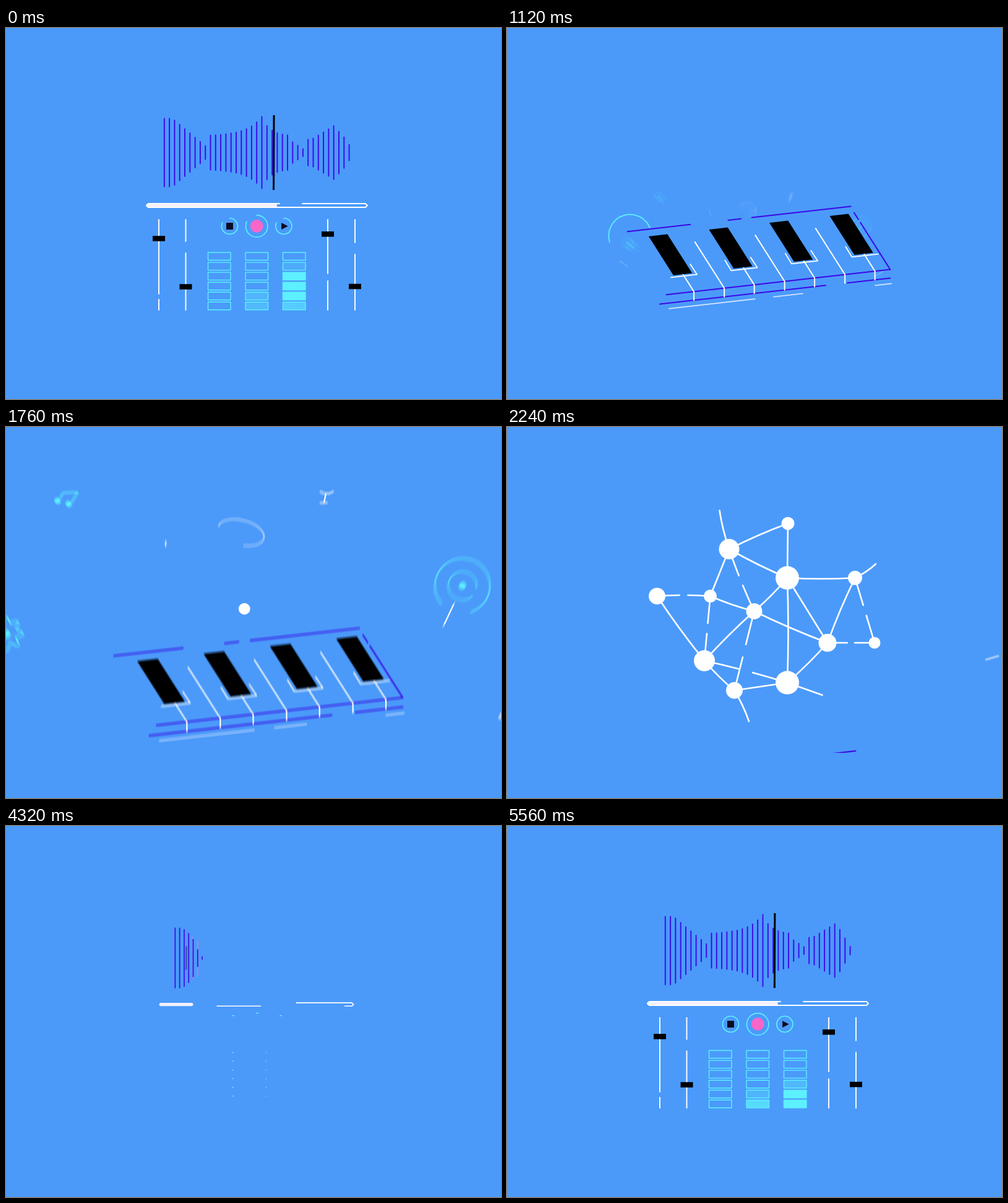
These frames come from a looping animation (800x600 px, 5600 ms). An HTML page with a canvas:

```html
<!DOCTYPE html>
<html lang="en">
<head>
<meta charset="utf-8">
<title>Music loop</title>
<style>
html, body { margin: 0; width: 100%; height: 100%; overflow: hidden; background: #4b9afa; }
canvas { display: block; }
</style>
</head>
<body>
<canvas id="stage" width="800" height="600"></canvas>
<script>
const LOOP = 5600, BG = '#4b9afa', WHITE = '#fff', INK = '#000', PURPLE = '#3d08e8', CYAN = '#5df0ff', PINK = '#f966c9';
const view = document.getElementById('stage').getContext('2d');
const buffer = document.createElement('canvas');
buffer.width = 800;
buffer.height = 600;
const c = buffer.getContext('2d');

const clamp = v => Math.max(0, Math.min(1, v));
const ramp = (t, start, span) => clamp((t - start) / span);
const easeOut = v => 1 - (1 - v) ** 2;
const smooth = v => v * v * (3 - 2 * v);
const mix = (a, b, k) => a + (b - a) * k;

// Polyline given as x, y, x, y...; only the part from k0 to k1 of its length is drawn.
function line(p, width, color, k1 = 1, k0 = 0, alpha = 1) {
  let len = 0;
  c.beginPath();
  c.moveTo(p[0], p[1]);
  for (let i = 2; i < p.length; i += 2) {
    c.lineTo(p[i], p[i + 1]);
    len += Math.hypot(p[i] - p[i - 2], p[i + 1] - p[i - 1]);
  }
  stroke(width, color, len, k1, k0, alpha);
}
function stroke(width, color, len = 0, k1 = 1, k0 = 0, alpha = 1) {
  if (k1 - k0 <= 0.001) return;
  c.setLineDash(k1 - k0 < 1 ? [len * (k1 - k0), len * 2] : []);
  c.lineDashOffset = -len * k0;
  c.lineWidth = width;
  c.strokeStyle = color;
  c.globalAlpha = alpha;
  c.stroke();
  c.globalAlpha = 1;
  c.setLineDash([]);
}
// Broken line: each pair of cuts is one dash, place() turns a cut into a point.
function dashes(cuts, place, ...style) {
  for (let i = 0; i < cuts.length; i += 2) line([...place(cuts[i]), ...place(cuts[i + 1])], ...style);
}
function arc(x, y, r, from, to, width, color, alpha = 1) {
  if (to <= from) return;
  c.beginPath();
  c.arc(x, y, r, from, to);
  stroke(width, color, 0, 1, 0, alpha);
}
function disc(x, y, r, color) {
  if (r <= 0) return;
  c.beginPath();
  c.arc(x, y, r, 0, 7);
  c.fillStyle = color;
  c.fill();
}
function poly(p, color) {
  c.beginPath();
  for (let i = 0; i < p.length; i += 2) c.lineTo(p[i], p[i + 1]);
  c.fillStyle = color;
  c.fill();
}
function zoom(x, y, s) {
  c.translate(x, y);
  c.scale(s, s);
  c.translate(-x, -y);
}

// ---- mixer ----
function barHeight(i) {
  if (i < 9) return Math.min(55, 66 - 6.9 * i);
  if (i < 25) return 27 + 31 * Math.exp(-Math.abs(i - 19) / (i < 19 ? 3 : 1.6));
  if (i < 28) return 17 - 5.5 * (i - 25);
  return 43 - (i < 33 ? Math.min(22, 5 * (33 - i)) : 9 * (i - 33));
}

function wave(m) {
  for (let i = 0; i < 37; i++) {
    const x = 255.8 + 8.3 * i, h = barHeight(i), out = 1 - ramp(m, 1840 + 9 * i, 120);
    const k = ramp(m, 270 + 40.3 * i, 100) * out;
    const bar = (part, color, a) => part > 0 && line([x, 201.5 - h * part, x, 201.5 + h * part], 1.9, color, 1, 0, a);
    if (k < 1 && out === 1) bar(clamp(k * 2), PINK, (1 - i / 37) * clamp(k * 2));
    bar(k, PURPLE, 1);
  }
  const head = 256 + 177 * easeOut(ramp(m, 440, 1360));
  const k = ramp(m, 460, 170) * (1 - ramp(m, 1960, 200));
  c.lineCap = 'butt';
  line([head, 201.5 - 60.5 * k, head - 0.5, 201.5 + 60.5 * k], 3, INK, 1, 0, k);
  c.lineCap = 'round';
}

function progress(m) {
  const out = ramp(m, 1880, 380);
  const edge = 230 + 205 * easeOut(ramp(m, 300, 1500));
  if (m > 300) line([229.5, 287, edge, 287], 6, '#f3effc', 1, out);
  line([479, 284, 581, 284, 584, 287, 581, 290, 230, 290, 227, 287, 230, 284, 442, 284],
    1.9, WHITE, ramp(m, 0, 1225) ** 2, out);
  line([413, 290, 333, 290], 1.9, WHITE, ramp(m, 100, 380), out);
}

function faders(m) {
  // x, knob, gap from, gap to
  [[247, 340.5, 430, 439], [290.5, 418.5, 345, 364], [520, 333.3, 397, 409], [564, 418, 347, 366]].forEach(([x, y, from, to], i) => {
    dashes([310, from, to, 456], v => [x, v], 1.9, WHITE, ramp(m, 540 + 50 * i, 300), ramp(m, 1930 + 30 * i, 180));
    const s = ramp(m, 640 + 50 * i, 160) * (1 - ramp(m, 1900 + 30 * i, 140));
    const slide = mix(i % 2 ? -40 : 40, 0, easeOut(ramp(m, 700, 1050)));
    c.fillStyle = INK;
    c.fillRect(x - 10 * s, y + slide - 4.3 * s, 20 * s, 8.6 * s);
  });
}

function buttons(m) {
  const top = -Math.PI / 2;
  for (let i = 0; i < 3; i++) {
    const x = 361.5 + 43.7 * i, r = i === 1 ? 17.7 : 13;
    const k = ramp(m, 510, 330) * (1 - ramp(m, 1770, 170));
    arc(x, 320.5, r, top, top + k * Math.PI * 2, 1.7, CYAN);
    c.save();
    c.translate(x, 320.5);
    const s = ramp(m, 570 + 40 * i, 180) * (1 - ramp(m, 1850 + 20 * i, 140));
    c.scale(s, s);
    if (i === 0) poly([-5.5, -5.5, 5.5, -5.5, 5.5, 5.5, -5.5, 5.5], '#0b0e20');
    if (i === 1) disc(0, 0, 10.4, PINK);
    if (i === 2) poly([-3.8, -5.5, 6.8, 0, -3.8, 5.5], '#0b0e20');
    c.restore();
  }
}

function meters(m, t) {
  // lag of the pulse, cap of the pulse that spans the loop point
  [[0, 0], [145, 1.3], [90, 5]].forEach(([lag, first], col) => {
    // Each pulse rises to its cap, then empties from the bottom.
    const p = (t + lag) % LOOP, n = Math.floor(p / 280), u = p % 280;
    const cap = n ? 1 + (n * 37 + col * 3) % 5 : first;
    const high = Math.min(cap, u * 0.046), low = Math.max(0, u - 80) * cap * 0.0075;
    const x = 326.5 + 60.5 * col;
    for (let r = 0; r < 6; r++) {
      const y = 443.3 - 16.05 * r;
      c.globalAlpha = clamp(high - r) * clamp(1 - low + r) * ramp(m, 840, 100) * (1 - ramp(m, 1860, 120));
      c.fillStyle = CYAN;
      c.fillRect(x, y, 36.5, 12.5);
      c.globalAlpha = 1;
      line([x + 36.5, y + 12.5, x, y + 12.5, x, y, x + 36.5, y, x + 36.5, y + 12.5], 1.4, CYAN,
        ramp(m, 514 + 5 * col, 340), ramp(m, 1900 + 30 * col, 200));
    }
  });
}

function mixer(t) {
  const m = (t + 1800) % LOOP;
  if (m > 2400) return;
  c.save();
  zoom(400, 300, Math.min(1, 0.878 + 0.000208 * (m - 520)));
  wave(m);
  progress(m);
  faders(m);
  buttons(m);
  meters(m, t);
  c.restore();
}

// ---- keyboard ----
// Slanted board: u counts black keys to the right, v black key lengths to the front.
const board = (u, v, drop = 0) => [229 + 97.5 * u + 40 * v, 337 - 11 * u + 63 * v + drop];
const BACK = -0.172, FRONT = 1.445, SIDE = 3.41, EDGE = 14;

function keyboard(t) {
  const gone = ramp(t, 2200, 160);
  const row = (cuts, v, drop, start) => dashes(cuts, u => board(u, v, drop), 2, PURPLE, easeOut(ramp(t, start, 300)), gone);
  c.save();
  c.translate(0, 240 * smooth(ramp(t, 1570, 690)));
  zoom(400, 370, 1 + 0.1 * Math.min(1, (t - 1120) / 640) - 0.05 * ramp(t, 1760, 480));
  row([-0.28, 0.76, 1.39, 1.6, 1.78, 3.42], BACK, 0, 560);
  row([-0.3, SIDE], FRONT, 0, 640);
  row([-0.41, 2.34, 2.7, SIDE], FRONT, EDGE, 680);
  dashes([-0.015, 0.16, 0.24, FRONT], v => board(SIDE, v), 2, PURPLE, easeOut(ramp(t, 620, 300)));
  dashes([-0.255, 1.17, 1.48, 1.96, 3.16, 3.43], u => board(u, FRONT, 23), 1.7, WHITE, ramp(t, 760, 260), 0, 0.8);
  const split = (u, v, start) => line([...board(u, v), ...board(u, FRONT), ...board(u, FRONT, EDGE)], 2, WHITE, ramp(t, start, 220));
  for (let i = 0; i < 4; i++) {
    const k = easeOut(ramp(t, 680 + 50 * i, 240));
    split(i + 0.157, 1, 660 + 60 * i);
    if (i < 3) split(i + 0.66, 0.26, 690 + 60 * i);
    poly([...board(i, 0), ...board(i + 0.31, 0), ...board(i + 0.31, k), ...board(i, k)], INK);
    const lip = [board(i - 0.055, 0.78), board(i - 0.06, 1.043), board(i + 0.373, 1.043), board(i + 0.37, 0.78)];
    line(lip.slice(i ? 0 : 1, i < 3 ? 4 : 3).flat(), 1.8, WHITE, ramp(t, 760 + 50 * i, 180));
  }
  c.restore();
}

// ---- thrown icons ----
function podcast() {
  c.rotate(0.44);
  disc(0, 0, 6, CYAN);
  arc(0, 0, 23, 0.4, 6, 2.6, CYAN, 0.7);
  arc(0, 0, 44.5, 2, 7.1, 2.6, CYAN, 0.8);
  line([0, 32, 0, 71], 2.2, WHITE);
}
function headphones() {
  c.rotate(0.25);
  c.beginPath();
  c.ellipse(0, 0, 38, 20, 0, 3.2, 7.6);
  stroke(2.4, WHITE, 0, 1, 0, 0.6);
}
function notes() {
  disc(-15, 4, 5, CYAN);
  disc(3, 9, 5, CYAN);
  line([-13, 3, -6, -9, 18, -10, 7, 7], 2.4, CYAN);
}
function stand() {
  line([-9, -9, -3, -6, 5, -6, 12, -9], 2.2, WHITE);
  line([0, -5, -3, 9], 2.2, WHITE);
  line([-9, 9, 2, 9], 2.2, WHITE);
}
function gear() {
  const ring = [];
  for (let a = 0; a < 6.4; a += 0.08) {
    const r = 22 + 5 * Math.cos(8 * a);
    ring.push(r * Math.cos(a), r * Math.sin(a));
  }
  line(ring, 2.6, CYAN);
  disc(0, 1, 7, CYAN);
}
const tick = () => line([0.5, -4, -0.5, 4], 2, WHITE);
const bead = () => disc(0, 0, 4, WHITE);

// Place at 1760 ms; every icon follows the same kind of thrown curve through it.
const ICONS = [
  [738, 256, podcast], [380, 170, headphones], [98, 115, notes], [517, 113, stand],
  [0, 333, gear], [258, 188, tick], [801, 466, bead], [-20, 420, bead]
];

function icons(t) {
  const d = t - 1760, back = 640, half = 0.0011;
  const spread = 1 - 0.0008 * d - 2.47e-6 * d * d;
  const s = ramp(t, 1040, 60) * mix(0.35, 1, Math.min(1, (d + back) / back));
  for (const [x, y, draw] of ICONS) {
    const start = 235 + 0.35 * y, v = (y - start) / back + half * back;
    c.save();
    c.translate(400 + (x - 400) * spread, y + v * d + half * d * d);
    c.scale(s, s);
    draw();
    c.restore();
  }
  const fade = ramp(t, 960, 120) * (1 - ramp(t, 1130, 150));
  arc(199 - (t - 1120) * 0.1, 336, 34.5, 2.85, 2.85 + 3.05 * ramp(t, 960, 150), 2, CYAN, fade);
  const w = t - 2240;
  line([774 + w * 0.1, 376 + w * 0.25, 794 + w * 0.1, 370 + w * 0.25], 2.6, WHITE, ramp(t, 1960, 160), ramp(t, 2260, 100), 0.7);
}

function show(t) {
  if (t < 560 || t > 2400) return;
  c.save();
  c.beginPath();
  c.rect(0, 0, 800, 527);
  c.clip();
  if (t > 960) icons(t);
  keyboard(t);
  c.restore();
}

// ---- network ----
// x, y, radius; points without a radius are loose ends.
const NODES = {
  g: [399.5, 298, 13], c: [453, 244, 19], b: [359, 197.5, 16.5], f: [328.5, 273.5, 10.5],
  j: [319, 378, 17], h: [518, 349, 14.5], l: [453, 413.5, 19], k: [367.5, 426, 13.5],
  a: [454, 156, 10.5], d: [562.5, 244, 11.5], e: [242.5, 273.5, 13.5], i: [594, 349, 9.5],
  m: [343.5, 135], n: [596, 221.5], o: [509.5, 433.5], p: [391, 476]
};
// The first end is the last to go; "~" has a gap in the middle.
const LINKS = 'a-b c-a c-b b~g f-b c-g c-d c-h c-l d-h d~i e~f e-j f~j g-f g-j g~k h-g l-h h~i j~l j-k k-l b-m d-n l-o k-p'.split(' ');

function network(t) {
  if (t < 1690 || t > 3850) return;
  const e = easeOut(ramp(t, 1760, 400)), u = ramp(t, 2450, 1400) * 1400 / 590;
  c.save();
  c.translate(-17 * (1 - e), 6 * (1 - e));
  zoom(406, 273, mix(0.6, 1, e) - 0.146 * u ** 1.3);
  LINKS.forEach((link, i) => {
    const [x0, y0] = NODES[link[0]], [x1, y1] = NODES[link[2]];
    const k = Math.min(ramp(t, 1880 + 6 * i, 170), clamp(1 - 0.36 * u * u));
    const len = Math.hypot(x1 - x0, y1 - y0), bend = (i % 3 - 1) * 3 / len;
    c.beginPath();
    c.moveTo(x0, y0);
    c.quadraticCurveTo((x0 + x1) / 2 + (y1 - y0) * bend, (y0 + y1) / 2 - (x1 - x0) * bend, x1, y1);
    if (link[1] === '-') return stroke(2.6, WHITE, len, k);
    stroke(2.6, WHITE, len, 0.42 * k);
    stroke(2.6, WHITE, len, 0.58 + 0.42 * k, 0.58);
  });
  Object.values(NODES).forEach(([x, y, r = 0], i) => {
    const grow = i ? easeOut(ramp(t, 1790 + 15 * i, 170)) : ramp(t, 1690, 60) * mix(1.2, 1, e);
    disc(x, y, r * grow * (1 - 0.35 * u * u), WHITE);
  });
  c.restore();
}

function draw(t) {
  c.fillStyle = BG;
  c.fillRect(0, 0, 800, 600);
  c.lineCap = c.lineJoin = 'round';
  mixer(t);
  show(t);
  network(t);
}

// Fast flight is averaged over a short shutter time.
function frame(now) {
  const t = now % LOOP, samples = t > 1000 && t < 2340 ? 8 : 1;
  for (let i = 0; i < samples; i++) {
    draw(t + (samples > 1 ? (i / (samples - 1) - 0.5) * 12 : 0));
    view.globalAlpha = 1 / (i + 1);
    view.drawImage(buffer, 0, 0);
  }
  requestAnimationFrame(() => frame(performance.now() - begin));
}
const begin = performance.now();
frame(0);
</script>
</body>
</html>
```
